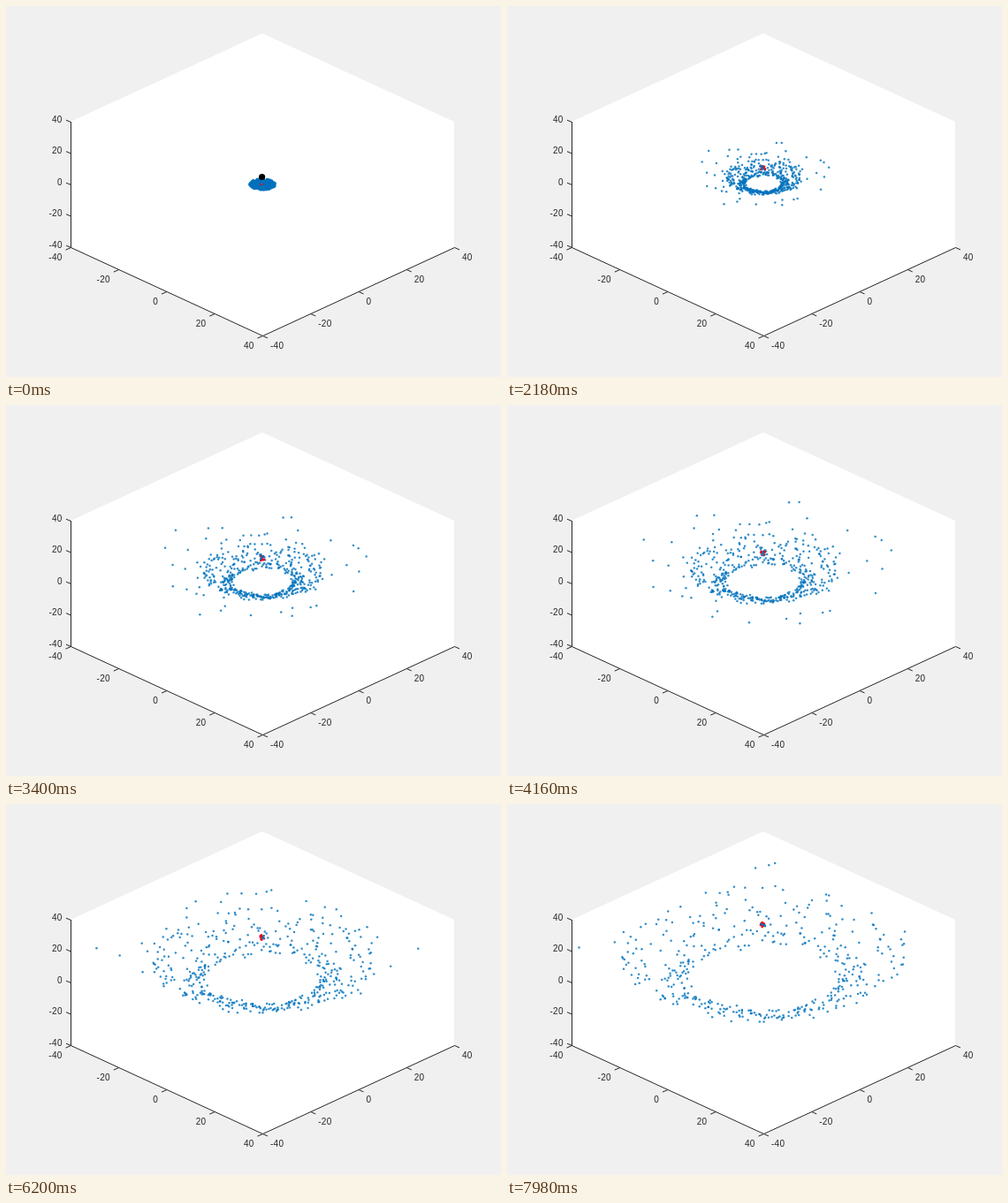
An HTML page with a canvas for the animation above (8 s loop, 560 by 420 pixels).

```html
<!DOCTYPE html>
<html lang="en">
<head>
<meta charset="utf-8">
<title>Particle disc</title>
<style>
  html, body { margin: 0; width: 560px; height: 420px; overflow: hidden; background: #f0f0f0; }
  svg, canvas { position: absolute; left: 0; top: 0; display: block; }
  text { font: 10px "Liberation Sans", Arial, sans-serif; letter-spacing: 0.25px; fill: #262626; }
  line, polyline { stroke: #262626; stroke-width: 1; fill: none; }
</style>
</head>
<body>
<svg width="560" height="420" viewBox="0 0 560 420">
  <polygon points="290,31 507,131 507,273 290,374 73,273 73,131" fill="#fff"/>
  <polyline points="73.5,131 73.5,273.5 290.5,373.5 507.5,273.5"/>
  <g id="ticks"></g>
</svg>
<canvas id="stage" width="560" height="420"></canvas>
<script>
const LOOP = 8000, STEP = 20;
const CX = 290, CY = 202;
const TILT = 1.25 / 2.7125;  // vertical squash of the floor plane
const REACH = 217;           // half width of the box on screen
const INNER = 11.2;          // speed of the ring's inner edge, px/s
const BLUE = '#0072bd', RED = '#f00010';

function drawTicks() {
  let out = '';
  const tick = (x, y, dx, dy, tx, ty, anchor, label) => {
    out += `<line x1="${x}" y1="${y}" x2="${x + dx}" y2="${y + dy}"/>` +
      `<text x="${tx}" y="${ty}" text-anchor="${anchor}">${label}</text>`;
  };
  for (let i = 0; i < 5; i++) {
    const label = i * 20 - 40;
    const across = i * 54.25, down = i * 25, up = i * 35.5;
    tick(73.5, 273.5 - up, -5.5, -2.3, 63.7, 273.7 - up, 'end', label);
    tick(73.5 + across, 273.5 + down, -6, 2.6, 63.5 + across, 288.4 + down, 'end', label);
    tick(290.5 + across, 373.5 - down, 5.5, 2.4, 299 + across, 388.4 - down, 'start', label);
  }
  document.getElementById('ticks').innerHTML = out;
}

function makeRandom(seed) {
  return () => {
    seed = (seed + 0x6d2b79f5) | 0;
    let v = Math.imul(seed ^ (seed >>> 15), seed | 1);
    v ^= v + Math.imul(v ^ (v >>> 7), v | 61);
    return ((v ^ (v >>> 14)) >>> 0) / 4294967296;
  };
}
const random = makeRandom(41);
const jitter = size => (random() * 2 - 1) * size;

// Each particle flies straight out of the disc; faster ones are lifted more.
function makeParticle(speed, angle) {
  const vx = speed * Math.cos(angle), depth = speed * Math.sin(angle);
  const lift = Math.min(5.5, 0.6 + 0.4 * (speed - INNER)) + jitter(0.8);
  const a = random() * 2 * Math.PI, r = 15 * Math.sqrt(random());
  return {
    vx, vy: depth * TILT - lift,
    reach: Math.abs(vx) + Math.abs(depth),
    delay: Math.max(0.1, 0.35 - 0.02 * (speed - INNER)),
    x0: r * Math.cos(a), y0: r * Math.sin(a) * TILT * 0.95
  };
}

function makeGroup(count, slow, spread, power) {
  return Array.from({ length: count }, (_, i) => makeParticle(
    slow + spread * random() ** power,
    (i + random()) / count * 2 * Math.PI
  ));
}

const particles = [
  ...makeGroup(410, INNER, 10, 1.6),
  ...makeGroup(95, 20, 20, 2)
];

const makeOrbits = (count, size) => Array.from({ length: count }, () => ({
  r: size * Math.sqrt(random()), phase: random() * 2 * Math.PI, rate: 5 + random() * 9
}));
const redCore = makeOrbits(12, 2.8);
const blueCore = makeOrbits(4, 3.4);

const ctx = document.getElementById('stage').getContext('2d');

function dot(x, y, r) {
  ctx.beginPath();
  ctx.arc(x, y, r, 0, 2 * Math.PI);
  ctx.fill();
}

function drawCore(orbits, t, color) {
  const grow = Math.min(1, 0.5 + t), squash = Math.min(1, 0.3 + t);
  ctx.fillStyle = color;
  for (const o of orbits) {
    const a = o.phase + o.rate * t, r = o.r * grow;
    dot(289.6 + r * Math.cos(a), 201.4 - 8.1 * t + r * Math.sin(a) * squash, 1.2);
  }
}

function drawParticles(t) {
  const u = Math.min(1, Math.max(0, (t - 0.1) / 1.4));
  const disc = 1 - u * u * (3 - 2 * u);
  ctx.fillStyle = BLUE;
  ctx.globalAlpha = 0.8;
  for (const p of particles) {
    const age = Math.max(0, t - p.delay);
    if (p.reach * age > REACH) continue;
    dot(CX + p.vx * age + p.x0 * disc, CY + p.vy * age + p.y0 * disc, 1.25);
  }
  ctx.globalAlpha = 1;
}

// The intruder falls until it leaves the box.
function drawIntruder(t) {
  const y = 193.5 + 46 * t;
  if (y > 273) return;
  ctx.fillStyle = '#000';
  dot(289.6, y, 3.6);
}

function draw(t) {
  ctx.clearRect(0, 0, 560, 420);
  drawParticles(t);
  drawCore(redCore, t, RED);
  drawCore(blueCore, t, BLUE);
  drawIntruder(t);
}

drawTicks();
draw(0);
const start = performance.now();
requestAnimationFrame(function run(now) {
  const elapsed = Math.max(0, now - start) % LOOP;
  draw(Math.floor(elapsed / STEP) * STEP / 1000);
  requestAnimationFrame(run);
});
</script>
</body>
</html>
```
